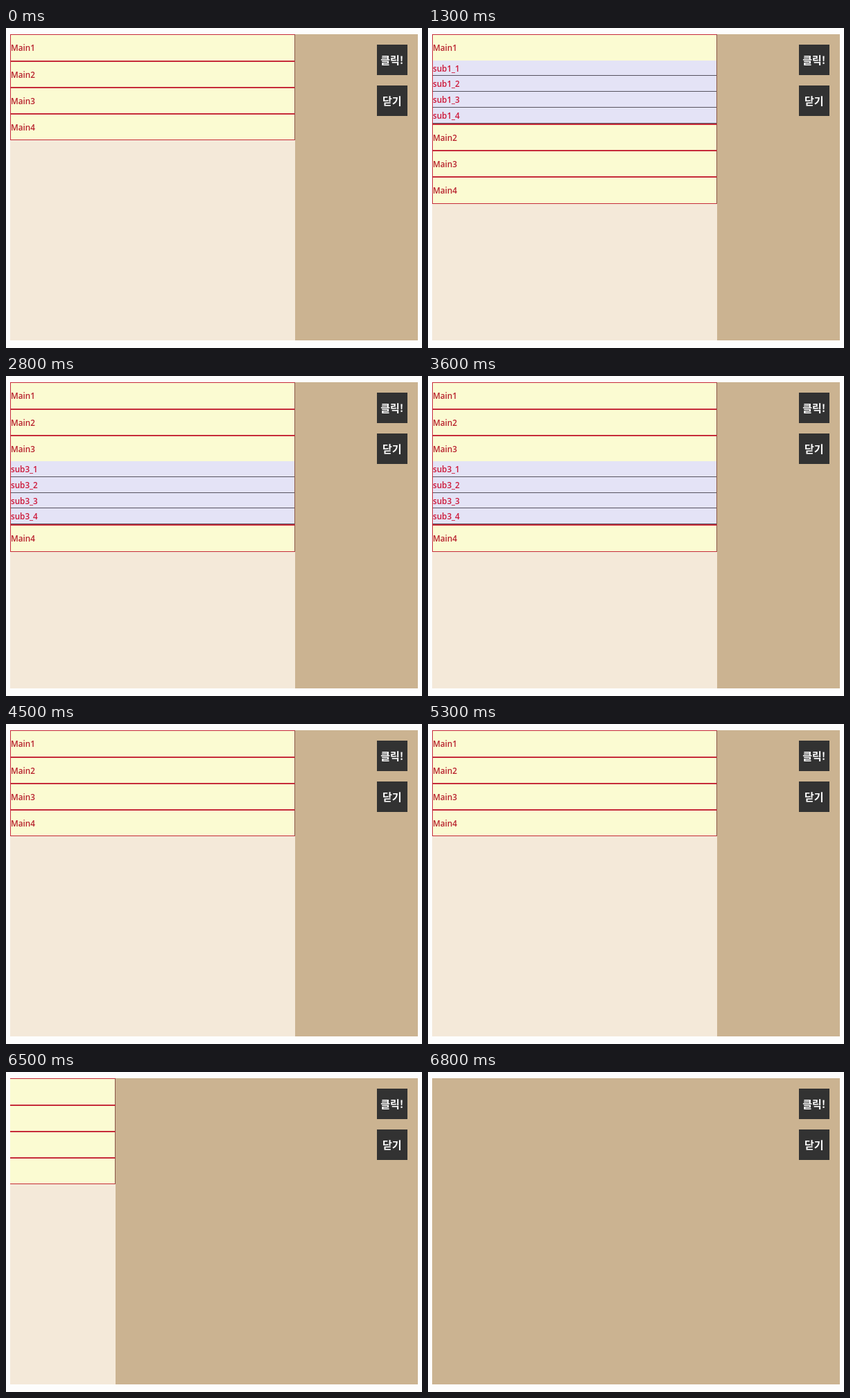
Recreate the animation shown at these times as an HTML page. Size 600 by 462 pixels, loop 8000 ms.

```html
<!DOCTYPE html>
<html lang="ko">
<head>
<meta charset="utf-8">
<title>Side menu</title>
<style>
  html, body { margin: 0; width: 100%; height: 100%; overflow: hidden; background: #fdfdfd; }
  * { box-sizing: border-box; }
  ul { margin: 0; padding: 0; list-style: none; }
  #stage { position: absolute; left: 6px; top: 9px; width: 587.5px; height: 442px; overflow: hidden; background: #cbb391; }
  #panel { position: absolute; left: 0; top: 0; width: 411.3px; height: 100%; background: #f4e9d9; }
  #menu { padding-top: .4px; font: 600 11.7px "Open Sans", "Noto Sans", sans-serif; }
  .item { border: 1px solid #c62b3a; border-right-color: #8b5748; background: #fbfbd2; }
  .item > span { display: block; height: 36.2px; line-height: 36.2px; color: #b7202c; }
  .sub { display: none; color: #cd1738; }
  .open .sub { display: block; }
  .sub li { height: 22.85px; line-height: 22px; border-bottom: 1px solid #57535f; background: #e4e3f6; }
  .button { position: absolute; left: 528.5px; width: 44.5px; height: 44.5px; background: #323232; color: #fff;
    font: 700 15px/44px "Noto Sans CJK KR", "Noto Sans CJK", sans-serif; text-align: center; white-space: nowrap; }
</style>
</head>
<body>
<div id="stage">
  <div id="panel"><ul id="menu"></ul></div>
  <div class="button" style="top:14.5px">클릭!</div>
  <div class="button" style="top:73.5px">닫기</div>
</div>
<script>
const LOOP = 8000, STEP = 100, PANEL_WIDTH = 411.3;
const SLIDE_START = 6317, SLIDE_TIME = 500;

// [start time, open submenu]; 0 means all closed
const hovers = [
  [0, 0], [1300, 1], [2200, 2], [2700, 3], [3200, 4],
  [3500, 3], [3700, 2], [3800, 1], [4100, 0], [4800, 4], [5000, 0]
];

const panel = document.getElementById('panel');
const menu = document.getElementById('menu');
const numbers = [1, 2, 3, 4];
menu.innerHTML = numbers.map(main =>
  `<li class="item"><span>Main${main}</span><ul class="sub">` +
  numbers.map(sub => `<li>sub${main}_${sub}</li>`).join('') +
  '</ul></li>').join('');

const bezier = (a, b, u) => 3 * a * u * (1 - u) ** 2 + 3 * b * u * u * (1 - u) + u ** 3;

// Equivalent of the CSS "ease" timing function
function ease(progress) {
  if (progress <= 0) return 0;
  if (progress >= 1) return 1;
  let low = 0, high = 1;
  for (let i = 0; i < 24; i++) {
    const mid = (low + high) / 2;
    if (bezier(.25, .25, mid) < progress) low = mid; else high = mid;
  }
  return bezier(.1, 1, low);
}

function render(now) {
  const time = Math.floor(now % LOOP / STEP) * STEP;
  const open = hovers.filter(([start]) => start <= time).pop()[1];
  [...menu.children].forEach((item, i) => item.classList.toggle('open', i + 1 === open));

  const shift = PANEL_WIDTH * ease((time - SLIDE_START) / SLIDE_TIME);
  panel.style.left = -shift + 'px';
  panel.style.visibility = shift > PANEL_WIDTH - 2 ? 'hidden' : 'visible';
}

const begin = performance.now();
function tick() {
  render(performance.now() - begin);
  requestAnimationFrame(tick);
}
tick();
</script>
</body>
</html>
```
